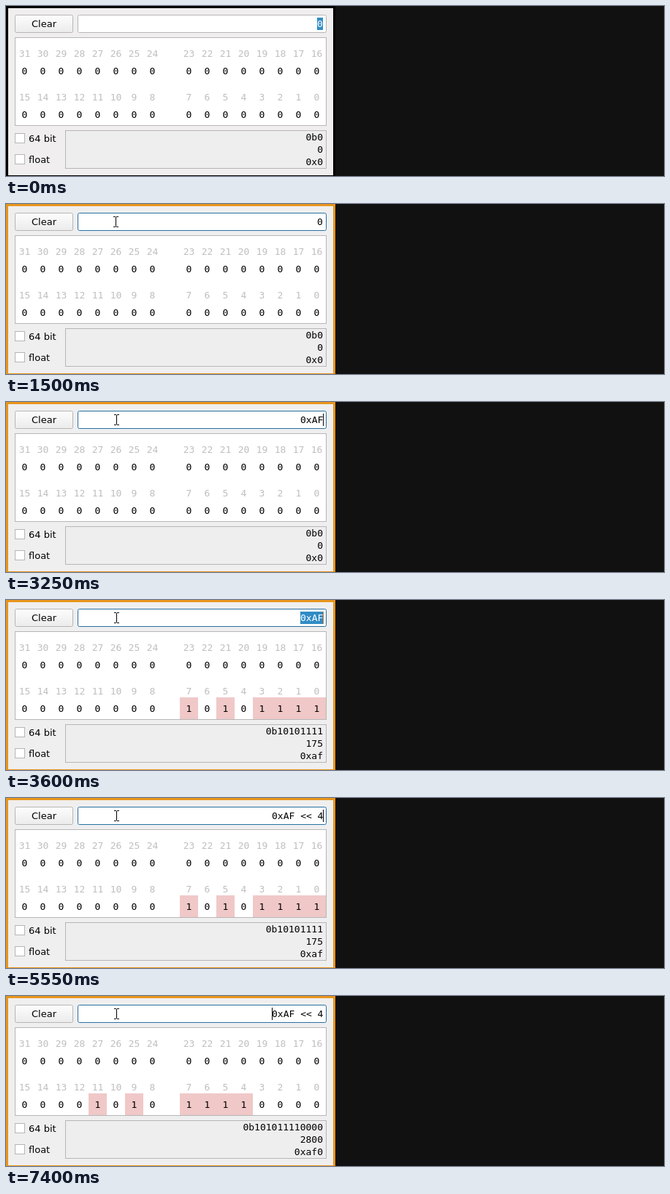
Write an HTML page that moves like this. It is 901x234 px and loops after 8 s.

```html
<!DOCTYPE html>
<html lang="en">
<head>
<meta charset="utf-8">
<title>Bit calculator</title>
<style>
  html, body { margin: 0; width: 100%; height: 100%; overflow: hidden; background: #111; }
  svg { display: block; }
  text { font: 13px "DejaVu Sans", sans-serif; fill: #000; white-space: pre; }
  .mono { font-family: "DejaVu Sans Mono", monospace; }
  .head { fill: #bfbfbf; }
  .mid { text-anchor: middle; }
  .end { text-anchor: end; }
  .line { stroke: #b6b6b6; }
</style>
</head>
<body>
<svg id="stage" width="901" height="234" viewBox="0 0 901 234">
  <defs>
    <linearGradient id="face" x2="0" y2="1">
      <stop stop-color="#fdfdfd"/><stop offset="1" stop-color="#ebebeb"/>
    </linearGradient>
  </defs>
</svg>
<script>
const LOOP = 8000, RIGHT = 434, ADVANCE = 13 * 0.60205;
const stage = document.getElementById('stage');

function add(tag, attrs, content = '') {
  const node = document.createElementNS('http://www.w3.org/2000/svg', tag);
  set(node, attrs);
  node.textContent = content;
  return stage.appendChild(node);
}
function set(node, attrs) {
  for (const key in attrs) node.setAttribute(key, attrs[key]);
}
const rect = (x, y, width, height, fill, more) => add('rect', { x, y, width, height, fill, ...more });
const box = (x, y, w, h, fill, rx = 0) =>
  rect(x + .5, y + .5, w - 1, h - 1, fill, { rx, class: 'line' });
const label = (x, y, content, cls = '') => add('text', { x, y, class: cls }, content);

// Window and controls
const frame = rect(0, 0, 451, 234, '#000');
const body = rect(3, 3, 445, 230, '#efefef');
box(12, 12, 80, 25, 'url(#face)', 2);
label(52, 29, 'Clear', 'mid');
const field = box(98, 12, 341, 25, '#fff', 2);
box(12, 43, 427, 122, '#fff');
box(81, 171, 358, 53, '#eee');
[[175, '64 bit'], [204, 'float']].forEach(([y, name]) => {
  box(12, y, 14, 14, '#fff');
  label(31, y + 12, name);
});

// Bit table, from bit 31 down to bit 0
const cells = [];
for (let bit = 31; bit >= 0; bit--) {
  const column = 15 - bit % 16;
  const x = 13 + 25 * (column + (column > 7));
  const y = bit > 15 ? 74 : 134;
  const back = rect(x, y, 25, 30, '#f0c8c8');
  label(x + 12.5, y - 4, bit, 'mono head mid');
  cells[bit] = { back, digit: label(x + 12.5, y + 20, '0', 'mono mid') };
}
const results = [185, 202, 219].map(y => label(RIGHT, y, '', 'mono end'));

// Input contents
const selection = rect(0, 16, 0, 17, '#308cc6');
const entry = label(0, 29, '', 'mono');
const caret = rect(0, 16, 1, 17, '#000');

// Pointers, both drawn around their hot spot
const arrow = add('path', {
  d: 'M0 0V14.5L3.3 11.4L6 17.6L8.3 16.6L5.6 10.6H10Z',
  fill: '#000', stroke: '#fff', 'stroke-width': 1, 'paint-order': 'stroke'
});
const beamPath = 'M-3 -6.5H0M1 -6.5H4M.5 -6V7M-3 7.5H0M1 7.5H4';
const beamHalo = add('path', { d: beamPath, stroke: '#fff', 'stroke-width': 3 });
const beam = add('path', { d: beamPath, stroke: '#000' });

// time, text, selected, caret, value
const EDITS = [
  [0, '0', true, '', 0],
  [750, '0', true, 'end', 0],
  [1200, '0', false, 'start', 0],
  [1500, '0', false, '', 0],
  [2050, '0', false, 'start', 0],
  [2300, '0', true, 'end', 0],
  [2800, '0', false, 'end', 0],
  [2850, '0x', false, 'end', 0],
  [3050, '0xA', false, 'end', 0],
  [3250, '0xAF', false, 'end', 0],
  [3600, '0xAF', true, 'end', 0xAF],
  [4250, '0xAF', false, 'start', 0xAF],
  [4350, '0xAF', false, 'end', 0xAF],
  [4650, '0xAF ', false, 'end', 0xAF],
  [4900, '0xAF <', false, 'end', 0xAF],
  [5050, '0xAF <<', false, 'end', 0xAF],
  [5400, '0xAF << ', false, 'end', 0xAF],
  [5550, '0xAF << 4', false, 'end', 0xAF],
  [6150, '0xAF << 4', true, 'end', 0xAF << 4],
  [6800, '0xAF << 4', true, '', 0xAF << 4],
  [7400, '0xAF << 4', false, 'start', 0xAF << 4]
];
// time, x, y
const POINTER = [
  [0, 130, -40], [750, 134, -8], [800, 138, 0], [850, 142, 6], [900, 146, 13],
  [950, 148, 18], [1000, 149, 21], [1050, 150, 24], [1900, 151, 24]
];
const at = (steps, time) => steps.findLast(step => step[0] <= time);

function showEdit([, text, selected, side, value]) {
  const width = text.length * ADVANCE;
  const left = RIGHT - Math.round(width);
  const selectedWidth = selected ? Math.ceil(width) : 0;
  const caretX = side === 'start' ? left : RIGHT;
  const covered = selected && caretX < left + selectedWidth;

  set(entry, { x: left, style: `fill:${selected ? '#fff' : '#000'}` });
  entry.textContent = text;
  set(selection, { x: left, width: selectedWidth });
  set(caret, { x: caretX, width: side ? 1 : 0, fill: covered ? '#cf7339' : '#000' });

  cells.forEach(({ back, digit }, bit) => {
    const on = value >>> bit & 1;
    set(back, { opacity: on });
    digit.textContent = on;
  });
  ['0b' + value.toString(2), value, '0x' + value.toString(16)]
    .forEach((line, i) => results[i].textContent = line);
}

function showPointer([, x, y]) {
  const inField = y >= 12;
  const transform = `translate(${x} ${y})`;
  set(arrow, { transform, opacity: inField ? 0 : 1 });
  for (const part of [beamHalo, beam]) set(part, { transform, opacity: inField ? 1 : 0 });
}

function showFocus(active) {
  set(frame, { fill: active ? '#e8951c' : '#000' });
  set(body, { fill: active ? '#efefef' : '#f0eeef' });
  set(field, { style: active ? 'stroke:#2670a0' : '' });
}

const start = performance.now();
function draw() {
  const time = (performance.now() - start) % LOOP;
  showFocus(time >= 750);
  showEdit(at(EDITS, time));
  showPointer(at(POINTER, time));
  requestAnimationFrame(draw);
}
draw();
</script>
</body>
</html>
```
